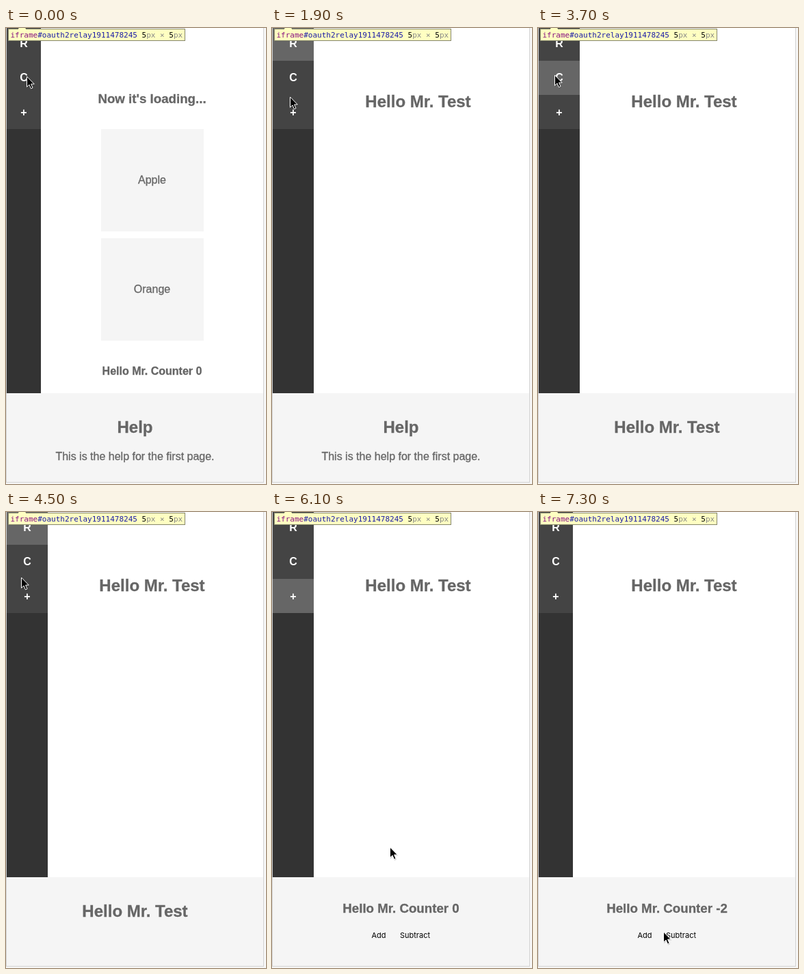
An HTML page for the animation above (7.4 s loop, 380 by 668 pixels).

```html
<!DOCTYPE html>
<html lang="en">
<head>
<meta charset="utf-8">
<title>Sidebar demo</title>
<style>
  html, body { margin: 0; width: 100%; height: 100%; overflow: hidden; background: #f7f7f7; }
  svg { display: block; width: 380px; height: 668px; }
  text {
    font: 16px "Liberation Sans", Arial, sans-serif;
    fill: #666; stroke: #666; stroke-width: .3px;
    text-anchor: middle; white-space: pre;
  }
  .h2, .h3, .h4, .menu text { font-weight: bold; }
  .h2 { font-size: 24px; }
  .h3 { font-size: 18.72px; }
  .menu text { fill: #fff; stroke: none; }
  .button { font: 11px Inter, sans-serif; fill: #000; stroke: none; }
  .tip text { font: 11px "DejaVu Sans Mono", monospace; fill: #000; stroke: none; text-anchor: start; }
  .tip .tag { fill: #881280; }
  .tip .id { fill: #1a1aa6; }
  .tip .unit { fill: #888; }
</style>
</head>
<body>
<svg viewBox="0 0 380 668">
  <rect width="380" height="668" fill="#f7f7f7"/>
  <rect width="377" height="666" fill="#d2d2d2"/>
  <rect x="1" width="375" height="535" fill="#fff"/>
  <rect x="1" y="535" width="375" height="130" fill="#f5f5f5"/>

  <g data-view="loading">
    <text class="h3" x="213.5" y="110">Now it's loading...</text>
    <path d="M139 148h150v150h-150zM139 308h150v150h-150z" fill="#f5f5f5"/>
    <text x="213.5" y="228">Apple</text>
    <text x="213.5" y="388">Orange</text>
    <text class="h4" x="213.5" y="508">Hello Mr. Counter 0</text>
  </g>
  <g data-view="test"><text class="h2" x="213.5" y="116">Hello Mr. Test</text></g>

  <g data-help="intro">
    <text class="h2" x="188.5" y="593">Help</text>
    <text x="188.5" y="633">This is the help for the first page.</text>
  </g>
  <g data-help="test"><text class="h2" x="188.5" y="593">Hello Mr. Test</text></g>
  <g data-help="counter">
    <text class="h3" x="188.5" y="587">Hello Mr. Counter <tspan id="count">0</tspan></text>
    <text class="button" x="156" y="624">Add</text>
    <text class="button" x="209" y="624">Subtract</text>
  </g>

  <rect class="bar" x="1" width="50" height="535" fill="#333"/>
  <g class="menu">
    <g><rect class="bar" x="1" y="-2" width="50" height="50"/><text y="28">R</text></g>
    <g><rect class="bar" x="1" y="48" width="50" height="50"/><text y="78">C</text></g>
    <g><rect class="bar" x="1" y="98" width="50" height="50"/><text y="129">+</text></g>
  </g>

  <g class="tip">
    <path d="M17 2l3-3h7l3 3z" fill="#ffffc2"/>
    <rect x="3.5" y="1.5" width="258" height="17" fill="#ffffc2" stroke="#85856a"/>
    <path d="M18 1.5h11" stroke="#ffffc2"/>
    <text x="6.5" y="14"><tspan class="tag">iframe</tspan><tspan class="id">#oauth2relay1911478245</tspan> 5<tspan class="unit">px ×</tspan> 5<tspan class="unit">px</tspan></text>
  </g>

  <g id="cursor">
    <path d="M1 2.5V18L4.5 14.5L7 20.5L10 19.3L7.5 13.5H12.5Z" fill="#000" opacity=".18"/>
    <path d="M.5 1V16.300L4 13L6.500 18.800L9 17.700L6.600 12.100H11.300Z" fill="#000" stroke="#fff"/>
  </g>
</svg>
<script>
const LOOP = 7400, STEP = 100;

// Each row: start time, value held until the next row.
const view = [[0, "loading"], [1400, "test"]];
const help = [[0, "intro"], [2500, "test"], [5700, "counter"]];
const active = [[0, -1], [1200, 0], [2500, 1], [4200, 0], [4900, 2], [6500, -1]];
const count = [[0, "0"], [6700, "-1"], [7000, "-2"]];

// Pointer: time, x, y.
const path = [
  [0, 30, 70], [500, 30, 70], [1000, 17, 22], [1500, 17, 22], [1900, 26, 100],
  [2100, 26, 100], [2500, 24, 68], [4000, 24, 68], [4200, 22, 24], [4500, 22, 95],
  [4800, 22, 115], [5700, 22, 115], [6100, 172, 490], [6500, 183, 600],
  [6600, 183, 614], [7400, 183, 614]
];

const all = selector => [...document.querySelectorAll(selector)];
const bars = all(".bar"), items = all(".menu g");
const counter = document.getElementById("count");
const cursor = document.getElementById("cursor");

const held = (rows, t) => rows.findLast(row => row[0] <= t)[1];

function show(key, name) {
  for (const el of all(`[data-${key}]`))
    el.style.display = el.dataset[key] === name ? "" : "none";
}

function pointerAt(t) {
  const i = path.findLastIndex(p => p[0] <= t);
  const a = path[i], b = path[i + 1];
  const k = (t - a[0]) / (b[0] - a[0]);
  return [1, 2].map(n => Math.round(a[n] + (b[n] - a[n]) * k));
}

function draw(t) {
  show("view", held(view, t));
  show("help", held(help, t));
  counter.textContent = held(count, t);
  const selected = held(active, t);
  const width = selected < 0 ? 50 : 60;
  bars.forEach(bar => bar.setAttribute("width", width));
  items.forEach((item, i) => {
    item.firstElementChild.setAttribute("fill", i === selected ? "#666" : "#444");
    item.lastElementChild.setAttribute("x", 1 + width / 2);
  });
  cursor.setAttribute("transform", `translate(${pointerAt(t)})`);
}

const start = performance.now();
function tick() {
  const t = (performance.now() - start) % LOOP;
  draw(Math.floor(t / STEP) * STEP);
  requestAnimationFrame(tick);
}
tick();
</script>
</body>
</html>
```
